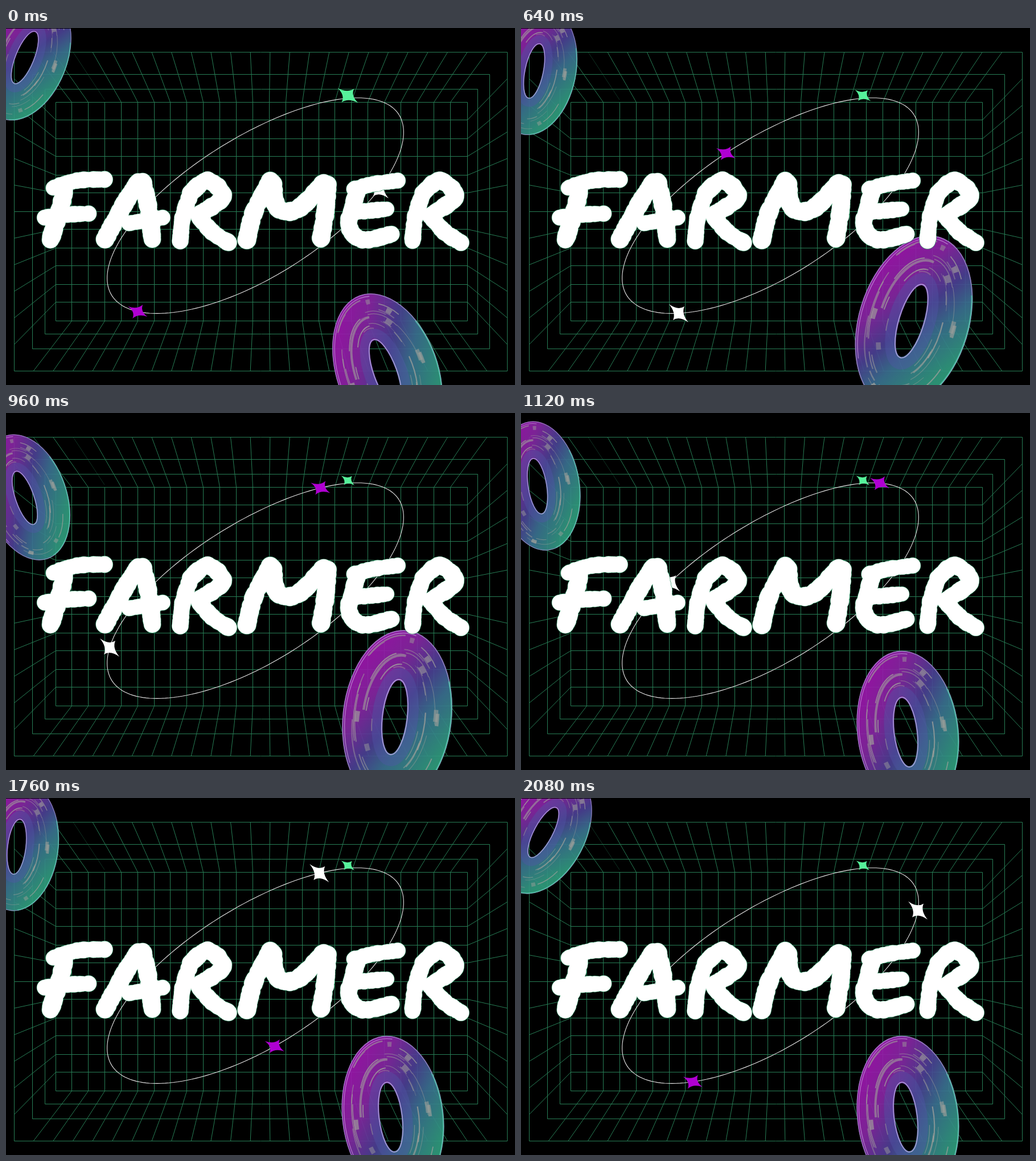
An HTML page with a canvas for the animation above (2.24 s loop, 894 px wide and 627 px high).

```html
<!DOCTYPE html>
<html lang="en">
<head>
<meta charset="utf-8">
<title>Farmer</title>
<style>
html, body { margin: 0; width: 100%; height: 100%; overflow: hidden; background: #000; }
canvas { display: block; }
</style>
</head>
<body>
<canvas id="stage" width="894" height="627" role="img" aria-label="FARMER"></canvas>
<script>
const ctx = document.getElementById('stage').getContext('2d');
const STEP = 160, COUNT = 14, TAU = Math.PI * 2;
const lerp = (a, b, t) => a + (b - a) * t;
const rad = deg => deg * Math.PI / 180;

let seed = 11;
const rnd = (a, b) => lerp(a, b, (seed = seed * 16807 % 2147483647) / 2147483647);

// Brush lettering: each stroke is a width and the points it passes through
const letters = {
  F: [[28, [83, 281], [125, 268], [173, 266]],
      [31, [103, 285], [93, 325], [78, 372]],
      [27, [68, 333], [105, 328], [145, 326]]],
  A: [[31, [232, 270], [206, 312], [174, 371]],
      [31, [240, 270], [250, 315], [257, 371]],
      [27, [216, 343], [275, 333]]],
  R: [[28, [324, 292], [311, 330], [306, 374]],
      [30, [324, 290], [354, 268], [381, 296], [342, 326]],
      [29, [338, 330], [362, 358], [391, 377]]],
  M: [[31, [423, 372], [436, 322], [464, 269]],
      [32, [468, 272], [477, 316], [512, 318], [558, 273]],
      [31, [565, 275], [561, 322], [553, 371]]],
  E: [[27, [611, 283], [645, 274], [688, 268]],
      [29, [616, 290], [602, 345], [626, 372], [677, 362]],
      [27, [608, 324], [669, 318]]]
};

function splineAt(p, i, t) {
  const [a, b, c, d] = [-1, 0, 1, 2].map(k => p[Math.max(0, Math.min(p.length - 1, i + k))]);
  return [0, 1].map(k => b[k] + t / 2 * (c[k] - a[k] +
    t * (2 * a[k] - 5 * b[k] + 4 * c[k] - d[k] + t * (3 * b[k] - a[k] - 3 * c[k] + d[k]))));
}

// Overlapping dabs of uneven size give the ragged edge
function brush(path, [width, ...pts], dx) {
  for (let i = 0; i < pts.length - 1; i++) {
    const [a, b] = [pts[i], pts[i + 1]];
    const n = Math.ceil(Math.hypot(b[0] - a[0], b[1] - a[1]) / 4);
    for (let j = 0; j <= n; j++) {
      const [x, y] = splineAt(pts, i, j / n), r = width / 2 * rnd(.93, 1.06);
      path.moveTo(x + dx + r, y);
      path.arc(x + dx, y, r, 0, TAU);
    }
  }
}

const word = new Path2D();
for (const key in letters) for (const stroke of letters[key]) brush(word, stroke, 0);
for (const stroke of letters.R) brush(word, stroke, 408);

// Tilted ellipse, slightly sagging along its flat sides
function orbitAt(deg) {
  const c = Math.cos(rad(deg)) * 298, s = Math.sin(rad(deg));
  return [438 + c * .846 + s * 65, 311 - c * .533 + s * 103 + s * s * 3.5];
}

// Angle of each star at the key steps
const keySteps = [0, 2, 5, 7, 9, 11, 13, 14];
const purple = [157, 223, 289, 332, 409, 457, 496, 517];
const white = [48, 92, 168, 242, 286, 310, 380, 408];

function keyed(values, f) {
  const i = keySteps.findLastIndex(k => k <= f);
  return lerp(values[i], values[i + 1], (f - keySteps[i]) / (keySteps[i + 1] - keySteps[i]));
}

// Ring poses: x, y, tilt in degrees, scale; then the pose taken at each step
const bigPoses = [[670, 604, -20, 1], [679.5, 560, -7, 1], [688.5, 530, 9, 1.09], [690, 516, 17, 1.09]];
const bigSeq = [0, .5, 1, 1.85, 3, 2, 1.85, 1, .5, 0, .5, 1, 1.85, 1];
const smallPoses = [[42, 62, 28, .8], [36, 53, 22, .8], [22, 86, 7, .79], [32, 128, -9, .8], [36, 148, -19, .8]];
const smallSeq = [1, 0, 1, 1.4, 1.7, 2, 4, 3, 4, 2, 1, 2, 1, 0];

function poseAt(poses, p) {
  const i = Math.min(Math.floor(p), poses.length - 2);
  return poses[i].map((v, k) => lerp(v, poses[i + 1][k], p - i));
}

function line(x0, y0, x1, y1) {
  ctx.moveTo(x0, y0);
  ctx.lineTo(x1, y1);
}

function drawGrid() {
  const [l, t, r, b] = [87.5, 130.5, 810.5, 514.5];
  const [L, T, Rt, B] = [14.5, 42.5, 880.5, 602.5];
  const snap = v => Math.floor(v) + .5;
  ctx.strokeStyle = '#277d55';
  ctx.lineWidth = 1;
  ctx.beginPath();
  for (const d of [0, .44, .74, 1]) {
    const x = snap(lerp(L, l, d)), y = snap(lerp(T, t, d));
    ctx.rect(x, y, snap(lerp(Rt, r, d)) - x, snap(lerp(B, b, d)) - y);
  }
  for (let i = 1; i < 25; i++) {
    const x = snap(86.6 + 28.9 * i), X = lerp(L, Rt, i / 25) - 1;
    line(x, t, x, b);
    line(x, b, X, B);
    if (i !== 3) line(X, T, x, t);
  }
  for (let i = 1; i < 12; i++) {
    const y = t + 32 * i - i % 2, Y = lerp(T, B, i / 12);
    line(l, y, r, y);
    line(L, Y, l, y);
    line(r, y, Rt, Y);
  }
  ctx.stroke();
  ctx.globalAlpha = .4;
  ctx.beginPath();
  line(118, T, 173, 126);
  ctx.stroke();
  ctx.globalAlpha = 1;
}

// Glints along the tube; a slight turn makes them cross it
const glints = Array.from({ length: 44 }, (_, i) => {
  const patch = i % 5 === 0;
  return {
    r: rnd(.25, .9), a: rnd(0, TAU), len: patch ? rnd(.08, .18) : rnd(.2, .9),
    w: patch ? rnd(6, 10) : rnd(.7, 2.5), turn: rnd(-.07, .07), color: `rgba(160,160,155,${rnd(.4, .8)})`
  };
});

function band(r, a0, a1, width, color, turn = 0) {
  ctx.beginPath();
  ctx.ellipse(lerp(-4, 0, r), 0, lerp(19, 89, r), lerp(60, 143, r), turn, a0, a1);
  ctx.lineWidth = width;
  ctx.strokeStyle = color;
  ctx.stroke();
}

function drawRing([x, y, deg, scale]) {
  ctx.save();
  ctx.translate(x, y);
  ctx.rotate(rad(deg));
  ctx.scale(scale, scale);
  ctx.beginPath();
  ctx.ellipse(0, 0, 89, 143, 0, 0, TAU);
  ctx.moveTo(15, 0);
  ctx.ellipse(-4, 0, 19, 60, 0, 0, TAU);
  const g = ctx.createLinearGradient(-82, -52, 82, 52);
  g.addColorStop(0, '#9a18ac');
  g.addColorStop(.22, '#8626a2');
  g.addColorStop(.48, '#4a4093');
  g.addColorStop(.68, '#3a7090');
  g.addColorStop(1, '#2f9c7c');
  ctx.globalAlpha = .92;
  ctx.fillStyle = g;
  ctx.fill('evenodd');
  ctx.globalAlpha = 1;
  band(.15, 0, TAU, 16, 'rgba(80,85,165,.4)');
  for (const q of glints) band(q.r, q.a, q.a + q.len, q.w, q.color, q.turn);
  band(.5, 3.2, 4.8, 4, 'rgba(160,160,155,.6)');
  band(.02, 0, TAU, 1.8, 'rgba(185,170,230,.8)');
  band(.94, 2.5, 4.9, 1.3, 'rgba(195,150,220,.7)');
  band(.99, 0, TAU, 1.6, 'rgba(165,145,205,.75)');
  band(.98, -.5, 1.4, 2, 'rgba(80,205,170,.7)');
  ctx.restore();
}

function drawOrbit() {
  ctx.beginPath();
  for (let a = 0; a < 360; a += 2) ctx.lineTo(...orbitAt(a));
  ctx.closePath();
  ctx.strokeStyle = '#e4e4e4';
  ctx.lineWidth = 1.1;
  ctx.stroke();
}

// Two opposite pairs of tips: one long, one short
function drawStar([x, y], [lx, ly], [sx, sy], size, color) {
  const tips = [[-lx, -ly], [sx, -sy], [lx, ly], [-sx, sy]];
  ctx.save();
  ctx.translate(x, y);
  ctx.scale(size, size);
  ctx.beginPath();
  ctx.moveTo(...tips[3]);
  tips.forEach(([px, py], i) => {
    const [qx, qy] = tips[(i + 3) % 4];
    ctx.quadraticCurveTo((px + qx) * .16, (py + qy) * .16, px, py);
  });
  ctx.fillStyle = color;
  ctx.fill();
  ctx.restore();
}

function draw(f) {
  ctx.fillStyle = '#000';
  ctx.fillRect(0, 0, 894, 627);
  drawGrid();
  ctx.save();
  ctx.beginPath();
  ctx.rect(0, 1, 894, 626);
  ctx.clip();
  drawRing(poseAt(smallPoses, smallSeq[f]));
  drawRing(poseAt(bigPoses, bigSeq[f]));
  ctx.restore();
  drawOrbit();
  const pulse = lerp(1, .65, Math.max(0, Math.min(1, (f - 2) / 3)));
  drawStar([600.5, 118.5], [18, 13], [11, 12], pulse, '#56f09a');
  drawStar(orbitAt(keyed(purple, f)), [17, 9], [9, 12], 1, '#b000d2');
  drawStar(orbitAt(keyed(white, f)), [17, 16], [10, 12], 1, '#fff');
  ctx.strokeStyle = '#3d9c70';
  ctx.lineWidth = 1.4;
  ctx.stroke(word);
  ctx.fillStyle = '#fff';
  ctx.fill(word);
}

const start = performance.now();
function tick() {
  draw(Math.floor((performance.now() - start) / STEP) % COUNT);
  requestAnimationFrame(tick);
}
tick();
</script>
</body>
</html>
```
